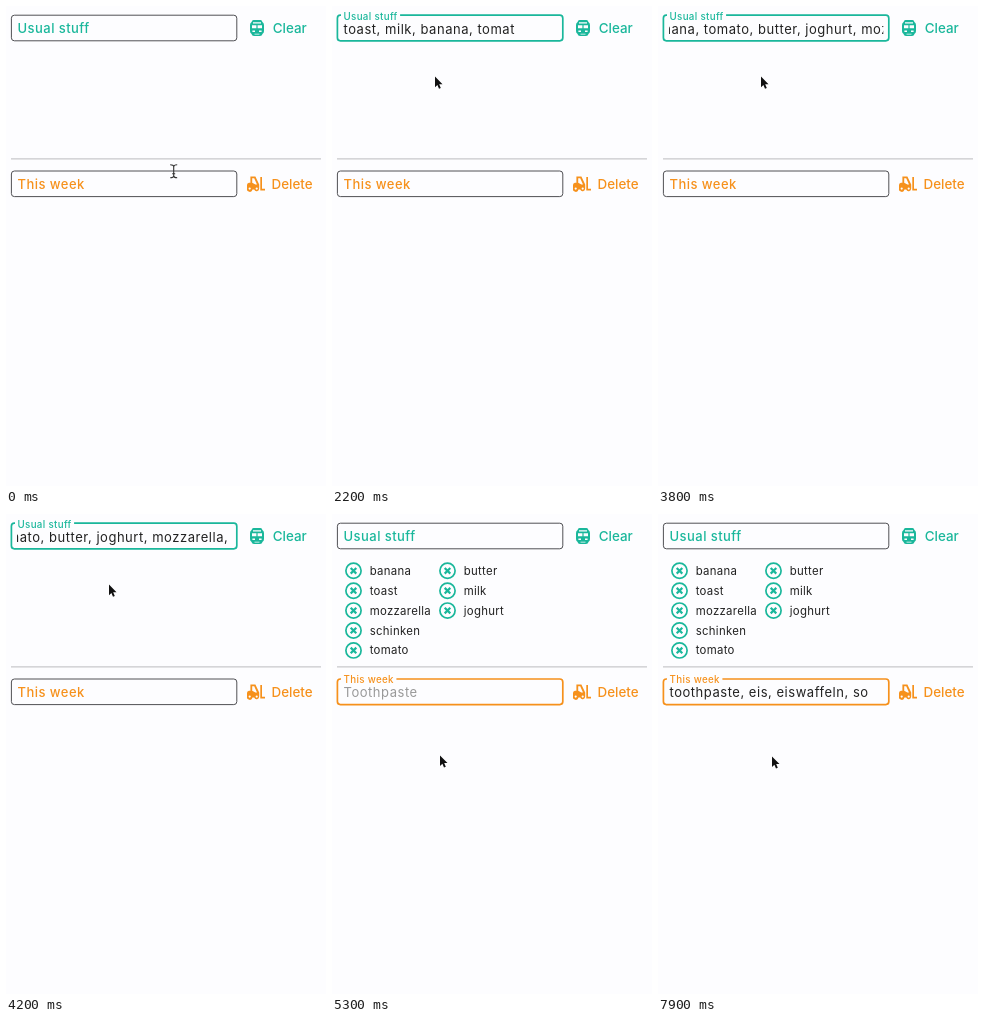
Write an HTML page that moves like this. It is 320x480 px and loops after 8000 ms.

```html
<!DOCTYPE html>
<html lang="en">
<head>
<meta charset="utf-8">
<title>Shopping list</title>
<style>
  html, body { margin: 0; width: 100%; height: 100%; overflow: hidden; background: #fdfdff; }
  svg { display: block; font-family: Inter, "Open Sans", sans-serif; }
  text { white-space: pre; }
  .teal { --c: #1ab79b; }
  .orange { --c: #f6911c; }
  .label, .entry { font-size: 13px; letter-spacing: .53px; }
  .label { font-weight: 500; letter-spacing: .45px; }
  .label, .button { fill: var(--c); }
  .entry { fill: #222; }
  .button { font-size: 13.4px; font-weight: 500; }
  .box { fill: none; }
  .item { font-size: 11.4px; letter-spacing: .3px; fill: #222; }
  .ring { fill: none; stroke: var(--c); stroke-width: 1.7; }
  .cross { stroke: var(--c); stroke-width: 2.2; }
</style>
</head>
<body>
<svg id="stage" width="320" height="480" viewBox="0 0 320 480">
  <defs>
    <clipPath id="inner"><rect x="11" y="0" width="214.3" height="40"/></clipPath>
  </defs>
  <path d="M5 152.9H315" stroke="#c9c9cb" stroke-width="1.2"/>
</svg>
<script>
const LOOP = 8000, FLOAT = 200;
const PAUSES = [900, 1400, 2400, 2600, 3600, 6400];
const USUAL = "toast, milk, banana, tomato, butter, joghurt, mozzarella, schinken";
const WEEK = "toothpaste, eis, eiswaffeln, so";
const SUBMIT = 4800, FOCUS_USUAL = 300, FOCUS_WEEK = 5000;

// Each key: time, then values
const usualKeys = [[400, 0], [800, 6], [1100, 10], [1300, 13], [2300, 27], [3000, 37],
  [3500, 45], [3800, 48.35], [4500, 65], [4600, 66]];
const weekKeys = [[5400, 0], [6300, 12], [7300, 24], [7900, 31]];
const mouseKeys = [[0, 167.7, 165.3], [300, 125, 24], [400, 122, 24], [800, 103, 70.6],
  [4800, 103, 70.6], [5000, 105, 176], [5300, 108, 241.4], [5400, 114, 242.4]];

const ICONS = {
  train: "M247.5 14H254.5Q256 14 256.4 16Q258 17 258 19V25Q258 27 256.6 27.8Q256 30 254 30H248Q246 30 245.4 27.8Q244 27 244 25V19Q244 17 245.6 16Q246 14 247.5 14ZM247 16.3V17.4H255V16.3ZM246 19.2V22.2H250.4V19.2ZM251.6 19.2V22.2H256V19.2ZM246.4 24.4V26H249V24.4ZM253 24.4V26H255.6V24.4ZM248.5 27.7V28.6H253.5V27.7Z",
  forklift: "M244.4 170.4H249.4L253.2 178.6V182.6A2.6 2.6 0 0 1 248.2 183.6H246.5A2.7 2.7 0 0 1 241 182.6V179Q241 177 243 176.8H244.4ZM246.2 172.2V176.8L249.4 178.4H251L248.2 172.2ZM254.3 171H256V182.8H259V184.4H254.3ZM243.7 183.7a1.1 1.1 0 1 1 0-2.2a1.1 1.1 0 1 1 0 2.2M250.7 183.7a1.1 1.1 0 1 1 0-2.2a1.1 1.1 0 1 1 0 2.2"
};

const stage = document.getElementById("stage");
const clamp = v => Math.min(1, Math.max(0, v));
const ease = v => v * v * (3 - 2 * v);

function add(parent, tag, attrs, text = "") {
  const el = document.createElementNS("http://www.w3.org/2000/svg", tag);
  for (const name in attrs) el.setAttribute(name, attrs[name]);
  el.textContent = text;
  return parent.appendChild(el);
}

function at(keys, t) {
  const next = keys.findIndex(k => k[0] > t);
  if (next === 0) return keys[0].slice(1);
  if (next < 0) return keys[keys.length - 1].slice(1);
  const a = keys[next - 1], b = keys[next], p = (t - a[0]) / (b[0] - a[0]);
  return a.slice(1).map((v, i) => v + (b[i + 1] - v) * p);
}

function makeField(y, theme, name, icon, action, actionX) {
  const group = add(stage, "g", { class: theme });
  add(group, "path", { d: ICONS[icon], fill: "var(--c)", "fill-rule": "evenodd" });
  const g = add(group, "g", { transform: `translate(0 ${y})` });
  const box = add(g, "rect", { class: "box", x: 5.4, y: 9.2, width: 225.4, height: 25.6, rx: 3 });
  const notch = add(g, "rect", { x: 9, y: 7, height: 5, fill: "#fdfdff" });
  const label = add(g, "text", { class: "label" }, name);
  const clip = add(g, "g", { "clip-path": "url(#inner)" });
  const entry = add(clip, "text", { class: "entry", y: 27.5 });
  add(g, "text", { class: "button", x: actionX, y: 26.8 }, action);
  return { box, notch, label, entry };
}

function drawField(f, focused, lift, text, typed, hint) {
  f.box.setAttribute("stroke", focused ? "var(--c)" : "#505054");
  f.box.setAttribute("stroke-width", focused ? 1.7 : 1);
  f.label.setAttribute("transform",
    `translate(11.5 ${26.7 - 13.2 * lift}) scale(${1 - .25 * lift})`);
  f.notch.setAttribute("width", lift * (f.label.getComputedTextLength() * .75 + 5));

  const count = Math.ceil(typed);
  f.entry.textContent = count ? text.slice(0, count) : hint;
  f.entry.style.fill = count ? "" : "#999";
  // The view follows the end of the text, trailing within a letter
  let end = 0;
  if (count) {
    const full = f.entry.getComputedTextLength();
    const last = count > 1 ? full - f.entry.getSubStringLength(0, count - 1) : full;
    end = full - (count - typed) * last;
  }
  f.entry.setAttribute("x", 11.5 - Math.max(0, end - 214.4));
}

const usual = makeField(0, "teal", "Usual stuff", "train", "Clear", 266.8);
const week = makeField(155.8, "orange", "This week", "forklift", "Delete", 265.6);

const list = add(stage, "g", { class: "teal" });
[["banana", "toast", "mozzarella", "schinken", "tomato"], ["butter", "milk", "joghurt"]]
  .forEach((names, col) => names.forEach((name, row) => {
    const g = add(list, "g", { transform: `translate(${21.5 + col * 94} ${56.8 + row * 19.9})` });
    add(g, "circle", { class: "ring", r: 7.6 });
    add(g, "path", { class: "cross", d: "M-2.8-2.8L2.8 2.8M2.8-2.8L-2.8 2.8" });
    add(g, "text", { class: "item", x: 16.2, y: 4 }, name);
  }));

const arrow = add(stage, "path", {
  d: "M0 0V10.6L2.4 8.4L4 12.2L5.8 11.4L4.2 7.7H7.5Z",
  fill: "#111", stroke: "#fff", "stroke-width": 1, "paint-order": "stroke"
});
const beam = add(stage, "path", {
  d: "M-3.5-6.5Q0-6.5 0-4.5Q0-6.5 3.5-6.5M0-4.5V4.5M-3.5 6.5Q0 6.5 0 4.5Q0 6.5 3.5 6.5M-1.5 2.5H1.5",
  fill: "none", stroke: "#333", "stroke-width": 1.1
});

function draw(now) {
  let t = Math.floor(now % LOOP / 100) * 100;
  if (PAUSES.includes(t)) t -= 100;

  const rise = start => ease(clamp((t - start) / FLOAT));
  const inUsual = t >= FOCUS_USUAL && t < FOCUS_WEEK;
  const inWeek = t >= FOCUS_WEEK;
  const weekLift = rise(FOCUS_WEEK);
  drawField(usual, inUsual, rise(FOCUS_USUAL) - weekLift, USUAL,
    t < SUBMIT ? at(usualKeys, t)[0] : 0, "");
  drawField(week, inWeek, weekLift, WEEK, at(weekKeys, t)[0],
    weekLift === 1 ? "Toothpaste" : "");
  list.style.display = t >= SUBMIT ? "" : "none";

  const [x, y] = at(mouseKeys, t);
  const overField = x < 231 && (y > 9 && y < 35 || y > 164 && y < 191);
  for (const el of [arrow, beam]) el.setAttribute("transform", `translate(${x} ${y})`);
  arrow.style.display = overField ? "none" : "";
  beam.style.display = overField ? "" : "none";
}

function tick() {
  draw(performance.now());
  requestAnimationFrame(tick);
}
tick();
</script>
</body>
</html>
```
